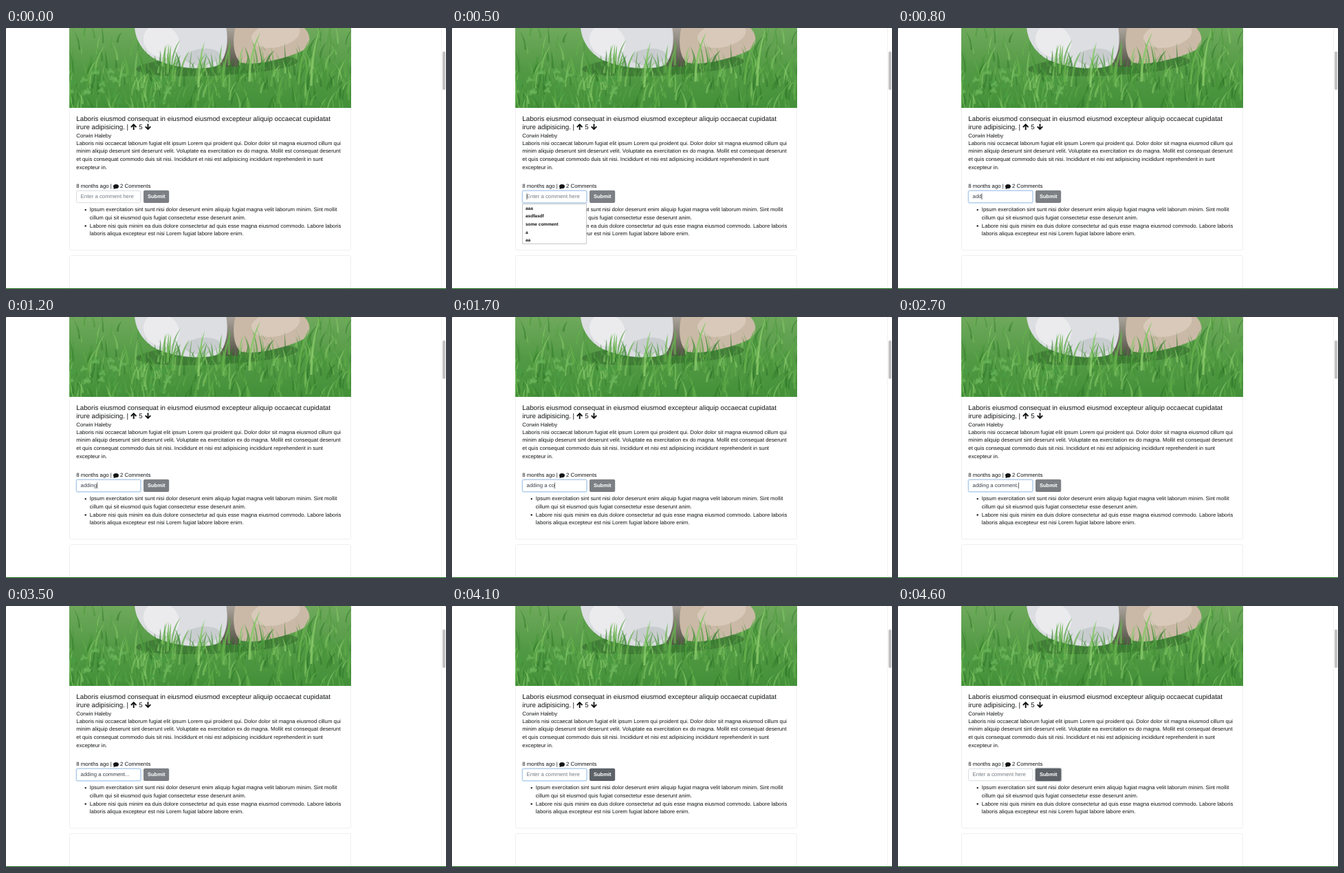
Write an HTML page with a canvas that moves like this. It is 640 px wide and 379 px high and loops after 4700 ms.

```html
<!DOCTYPE html>
<html lang="en">
<head>
<meta charset="utf-8">
<title>Comment form</title>
<style>
html, body { margin: 0; width: 100%; height: 100%; overflow: hidden; background: #fff; }
canvas { display: block; width: 640px; height: 379px; }
</style>
</head>
<body>
<canvas id="stage"></canvas>
<script>
const W = 640, H = 379, LOOP = 4700;
const BODY = 7.82, TITLE = 9.77, INK = '#121416';
const SANS = '"Liberation Sans", Arial, sans-serif';
const dpr = window.devicePixelRatio || 1;
const stage = document.getElementById('stage');
const ctx = prepare(stage, W, H);

const TITLE_LINES = [
  'Laboris eiusmod consequat in eiusmod eiusmod excepteur aliquip occaecat cupidatat',
  'irure adipisicing. |'
];
const POST_LINES = [
  'Laboris nisi occaecat laborum fugiat elit ipsum Lorem qui proident qui. Dolor dolor sit magna eiusmod cillum qui',
  'minim aliquip deserunt sint deserunt velit. Voluptate ea exercitation ex do magna. Mollit est consequat deserunt',
  'et quis consequat commodo duis sit nisi. Incididunt et nisi est adipisicing incididunt reprehenderit in sunt',
  'excepteur in.'
];
const COMMENT_LINES = [
  'Ipsum exercitation sint sunt nisi dolor deserunt enim aliquip fugiat magna velit laborum minim. Sint mollit',
  'cillum qui sit eiusmod quis fugiat consectetur esse deserunt anim.',
  'Labore nisi quis minim ea duis dolore consectetur ad quis esse magna eiusmod commodo. Labore laboris',
  'laboris aliqua excepteur est nisi Lorem fugiat labore labore enim.'
];
const HISTORY = ['aaa', 'asdfasdf', 'some comment', 'a', 'aa'];

const MESSAGE = 'adding a comment...';
const FOCUS = 200, OPEN = 300, HOVER = 3800, SEND = 4100;

// Time at which each character of the message is typed
function keyTime(i) {
  if (i < 6) return 600 + i * 100;
  if (i < 15) return 700 + i * 100;
  return [2300, 2600, 2800, 3000][i - 15];
}

function prepare(canvas, w, h) {
  canvas.width = Math.round(w * dpr);
  canvas.height = Math.round(h * dpr);
  const c = canvas.getContext('2d');
  c.scale(dpr, dpr);
  return c;
}

function random(seed) {
  return () => {
    seed = (seed * 1664525 + 1013904223) >>> 0;
    return seed / 4294967296;
  };
}

function clamp(v) { return Math.max(0, Math.min(1, v)); }

function text(str, x, y, size = BODY, color = INK, weight = '') {
  ctx.font = `${weight} ${size}px ${SANS}`;
  ctx.fillStyle = color;
  ctx.fillText(str, x, y);
}

function lines(list, x, y, step, size) {
  list.forEach((s, i) => text(s, x, y + i * step, size));
}

function box(x, y, w, h, r, fill, stroke) {
  ctx.beginPath();
  ctx.roundRect(x, y, w, h, r);
  if (fill) { ctx.fillStyle = fill; ctx.fill(); }
  if (stroke) { ctx.strokeStyle = stroke; ctx.lineWidth = 1; ctx.stroke(); }
}

function blade(c, x, y, dx, h, w, color) {
  c.fillStyle = color;
  c.beginPath();
  c.moveTo(x - w, y);
  c.quadraticCurveTo(x - w, y - h * 0.6, x + dx, y - h);
  c.quadraticCurveTo(x + w, y - h * 0.5, x + w, y);
  c.fill();
}

function blob(c, color, x, y, rx, ry, turn = 0) {
  c.fillStyle = color;
  c.beginPath();
  c.ellipse(x, y, rx, ry, turn, 0, Math.PI * 2);
  c.fill();
}

function makePhoto() {
  const canvas = document.createElement('canvas');
  const c = prepare(canvas, 410, 116);
  const rnd = random(71);
  const greens = ['#479539', '#65b04c', '#86c868', '#327a2b', '#559f45'];
  const pick = () => greens[Math.floor(rnd() * greens.length)];

  const field = c.createLinearGradient(0, 0, 0, 116);
  field.addColorStop(0, '#6fa95c');
  field.addColorStop(0.5, '#549a46');
  field.addColorStop(1, '#439039');
  c.fillStyle = field;
  c.fillRect(0, 0, 410, 116);

  function grass(n, left, right, top, bottom, tall, alpha) {
    c.globalAlpha = alpha;
    for (let i = 0; i < n; i++) {
      const x = left + (right - left) * rnd();
      const y = top + (bottom - top) * (i + rnd()) / n;
      blade(c, x, y, (rnd() - 0.5) * 30, tall * (0.5 + rnd()), 0.7 + rnd() * 1.2, pick());
    }
    c.globalAlpha = 1;
  }

  grass(170, -5, 415, 10, 90, 26, 0.55);

  // Animal: pale front, brown rear and the grey fur between
  c.globalAlpha = 0.45;
  blob(c, '#2c5a27', 215, 54, 118, 15, -0.05);
  c.globalAlpha = 1;
  const fur = c.createLinearGradient(0, 0, 0, 60);
  fur.addColorStop(0, '#aaa39b');
  fur.addColorStop(1, '#4c4a3e');
  c.fillStyle = fur;
  c.fillRect(220, 0, 27, 56);
  c.fillStyle = '#cab9a6';
  c.beginPath();
  c.moveTo(242, -2);
  c.lineTo(340, -2);
  c.bezierCurveTo(354, 10, 352, 28, 337, 34);
  c.bezierCurveTo(315, 44, 270, 56, 249, 50);
  c.bezierCurveTo(240, 43, 236, 20, 242, -2);
  c.fill();
  blob(c, '#d8c9ba', 300, 10, 36, 18, -0.2);
  c.fillStyle = '#dcdee2';
  c.beginPath();
  c.moveTo(95, -2);
  c.bezierCurveTo(96, 18, 108, 36, 126, 46);
  c.bezierCurveTo(154, 59, 200, 63, 219, 53);
  c.bezierCurveTo(229, 38, 232, 20, 228, -2);
  c.fill();
  blob(c, '#ebebee', 134, 19, 27, 23, 0.5);
  blob(c, '#c9cdcf', 194, 42, 26, 12, -0.1);

  grass(70, 105, 355, 54, 78, 30, 0.7);
  grass(90, -5, 415, 62, 90, 28, 0.6);
  grass(250, -5, 415, 76, 134, 25, 0.6);

  // Clover near the bottom left
  c.globalAlpha = 0.6;
  for (let i = 0; i < 26; i++) {
    const x = rnd() * 150, y = 62 + rnd() * 46;
    for (let k = 0; k < 3; k++) {
      const a = k * 2.1 + rnd();
      blob(c, i % 2 ? '#6cb75b' : '#4b9c45', x + Math.cos(a) * 3, y + Math.sin(a) * 2, 3, 2.2, a);
    }
  }
  c.globalAlpha = 0.85;
  [[108, 68, -10, 38], [150, 78, 8, 44], [188, 86, 9, 66], [196, 84, -14, 52],
   [224, 80, 12, 58], [262, 78, 16, 72], [282, 74, -9, 58], [334, 82, 16, 66],
   [352, 84, 12, 82], [372, 90, -18, 74]].forEach(([x, y, dx, h], i) =>
    blade(c, x, y, dx, h, 1.6, greens[i % 3]));
  return canvas;
}

function arrow(x, y, dir) {
  ctx.save();
  ctx.translate(x, y);
  ctx.scale(1, dir);
  ctx.strokeStyle = INK;
  ctx.lineWidth = 1.9;
  ctx.beginPath();
  ctx.moveTo(-3.8, 0.4);
  ctx.lineTo(0, -3.4);
  ctx.lineTo(3.8, 0.4);
  ctx.moveTo(0, -3);
  ctx.lineTo(0, 4.3);
  ctx.stroke();
  ctx.restore();
}

function bubble(x, y) {
  blob(ctx, INK, x, y, 4, 3.1);
  ctx.beginPath();
  ctx.moveTo(x - 3, y + 1);
  ctx.lineTo(x - 3.6, y + 4);
  ctx.lineTo(x + 0.5, y + 2.8);
  ctx.fill();
}

const photo = makePhoto();

function drawPage() {
  ctx.fillStyle = '#fff';
  ctx.fillRect(0, 0, W, H);
  box(92.5, -10, 409, 332.5, 2, null, '#efefef');
  box(92.5, 330.5, 409, 80, 2, null, '#efefef');
  ctx.drawImage(photo, 92, 0, 410, 116);

  lines(TITLE_LINES, 102.3, 134.7, 11.8, TITLE);
  arrow(185.7, 143.6, 1);
  text('5', 193.2, 146.5, TITLE);
  arrow(206.5, 143.6, -1);
  text('Corwin Haleby', 102.3, 159);
  lines(POST_LINES, 102.3, 169.6, 11.65);
  text('8 months ago |', 102.3, 232.3);
  bubble(160, 230);
  text('2 Comments', 166, 232.3);
  lines(COMMENT_LINES, 121.8, 266.4, 11.65);
  blob(ctx, INK, 115.7, 264.1, 1.2, 1.2);
  blob(ctx, INK, 115.7, 287.4, 1.2, 1.2);

  ctx.fillStyle = '#f0f0f0';
  ctx.fillRect(633, 0, 1, 378);
  box(635, 34, 4.2, 56, 2, '#c2c2c2');
  ctx.fillStyle = '#0b5f0b';
  ctx.fillRect(0, 378, W, 1);
  ctx.fillStyle = '#bbb';
  ctx.fillRect(0, 0, 1, 1);
  ctx.fillRect(W - 1, 0, 1, 1);
}

function drawField(t, typed, count) {
  const glow = clamp((t - FOCUS) / 150) * (1 - clamp((t - SEND) / 150));
  if (glow > 0) {
    ctx.globalAlpha = glow;
    box(101.2, 234.9, 96, 20.2, 3, '#d9e8f8');
    ctx.globalAlpha = 1;
  }
  box(102.6, 236.3, 93.2, 17.4, 2, '#fff', glow > 0.5 ? '#a9c8e8' : '#d8dce0');
  if (typed) text(typed, 108.6, 247.4, BODY, '#3a4046');
  else text('Enter a comment here', 108.6, 247.4, BODY, '#747b82');

  if (t < FOCUS || t >= SEND) return;
  const since = t - (count ? keyTime(count - 1) : FOCUS);
  if (since % 1000 < 500) {
    ctx.font = `${BODY}px ${SANS}`;
    ctx.fillStyle = '#333';
    ctx.fillRect(108.6 + ctx.measureText(typed).width, 240.4, 0.7, 8.8);
  }
}

function drawButton(t) {
  const ring = clamp((t - SEND) / 150);
  if (ring > 0) {
    ctx.globalAlpha = ring;
    box(198.7, 234.7, 39.8, 20.6, 3, '#c8cbce');
    ctx.globalAlpha = 1;
  }
  const dark = clamp((t - HOVER) / 150);
  const mix = (a, b) => Math.round(a + (b - a) * dark);
  box(200, 235.8, 37.2, 18.2, 2, `rgb(${mix(124, 92)},${mix(128, 98)},${mix(132, 104)})`);
  text('Submit', 205.9, 247.4, 7.6, '#fff', 'bold');
}

function drawHistory(t, typed) {
  if (t < OPEN || t >= SEND) return;
  const items = HISTORY.filter(s => s.startsWith(typed));
  if (!items.length) return;
  box(102.5, 255.5, 93.2, items.length * 11.65 - 0.4, 0, '#fff', '#c6c6c6');
  items.forEach((s, i) => text(s, 107, 263.7 + i * 11.65, 6.5, '#111', 'bold'));
}

function draw(t) {
  let count = 0;
  while (count < MESSAGE.length && t >= keyTime(count)) count++;
  const typed = t < SEND ? MESSAGE.slice(0, count) : '';
  drawPage();
  drawField(t, typed, count);
  drawButton(t);
  drawHistory(t, typed);
}

ctx.textRendering = 'geometricPrecision';
const start = performance.now();
function frame() {
  draw((performance.now() - start) % LOOP);
  requestAnimationFrame(frame);
}
frame();
</script>
</body>
</html>
```
